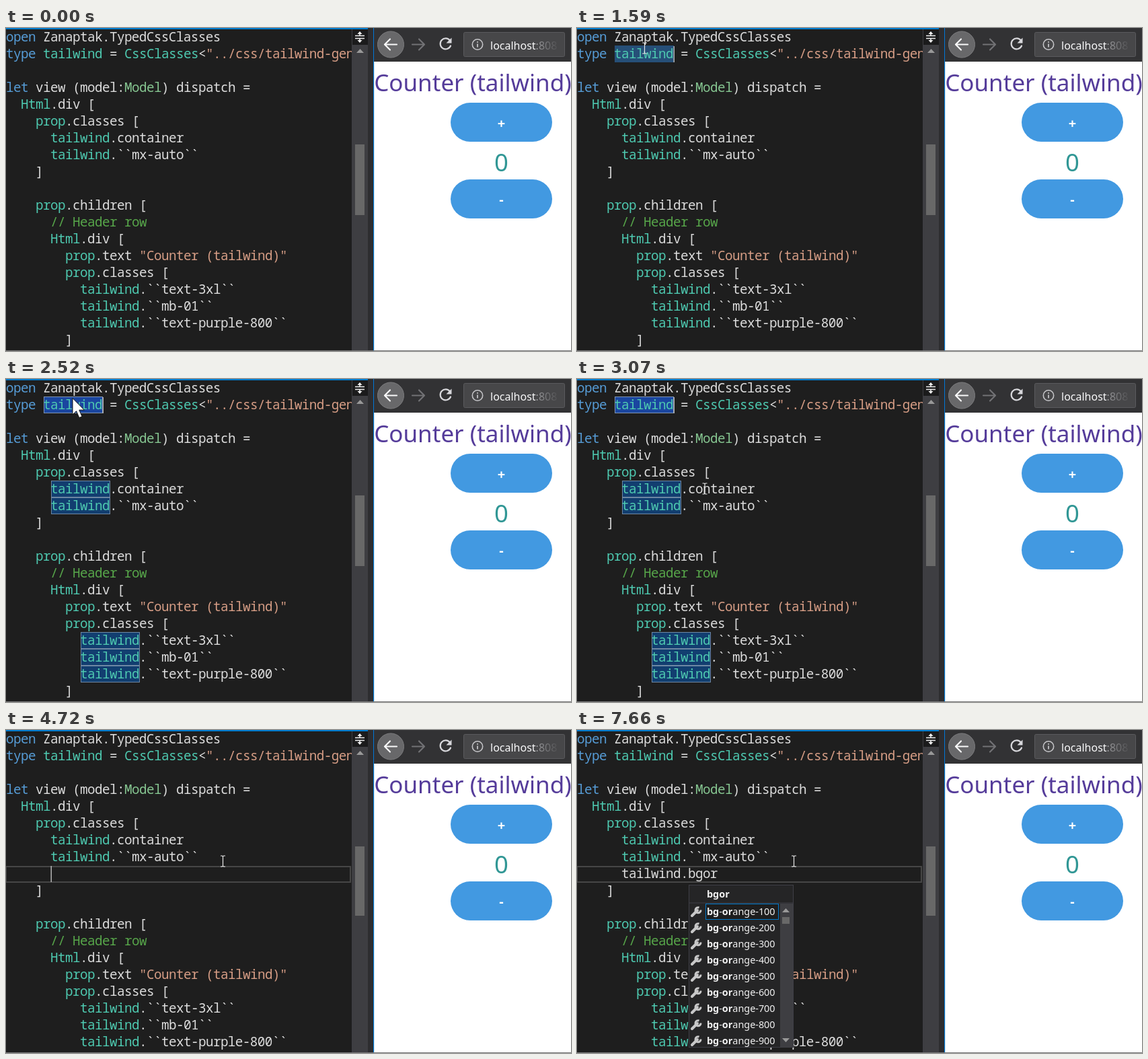
An HTML page for the animation above (8000 ms loop, 840x480 px).

```html
<!DOCTYPE html>
<html lang="en">
<head>
<meta charset="utf-8">
<title>Typed CSS classes</title>
<style>
  html, body { margin: 0; width: 100%; height: 100%; overflow: hidden; background: #1e1e1e; }
  svg { display: block; width: 840px; height: 480px; }
  .code { font: 19.3px "Noto Sans Mono", "DejaVu Sans Mono", monospace; letter-spacing: -.58px; fill: #dcdcdc; }
  .ui { font-family: "Noto Sans", "Open Sans", sans-serif; }
  .bold { font-weight: 700; }
  .word { fill: #569cd6; }
  .type { fill: #4ec9b0; }
  .record { fill: #86c691; }
  .string { fill: #d69d85; }
  .comment { fill: #57a64a; }
  .ref { fill: #123e70; stroke: #6d87a3; }
</style>
</head>
<body>
<svg viewBox="0 0 840 480" xmlns="http://www.w3.org/2000/svg">
  <defs>
    <clipPath id="pane"><rect width="514" height="479"/></clipPath>
    <linearGradient id="fade" gradientUnits="userSpaceOnUse" x1="787" x2="823" y1="0" y2="0">
      <stop stop-color="#a0a0a3"/><stop offset="1" stop-color="#474749"/>
    </linearGradient>
  </defs>

  <!-- editor -->
  <rect width="538" height="480" fill="#1e1e1e"/>
  <g clip-path="url(#pane)">
    <g id="marks"></g>
    <rect id="line" x="0" width="512" height="23" fill="none" stroke="#464646" stroke-width="2"/>
    <g class="code" transform="translate(-1 0)">
      <g id="head"></g>
      <g id="tail"></g>
      <text id="typed" x="67" y="220"></text>
    </g>
    <rect id="caret" width="1.5" height="24" fill="#b4b4b4"/>
  </g>
  <rect x="514" width="24" height="480" fill="#3e3e42"/>
  <rect x="515" y="2" width="23" height="23" fill="#1b1b1c"/>
  <path d="M519 11.5h14M519 15.5h14M526 6v5M526 16v5" stroke="#f1f1f1" stroke-width="1.6"/>
  <path d="M522.5 9l3.5-4 3.5 4zM522.5 18l3.5 4 3.5-4z" fill="#f1f1f1"/>
  <path d="M521 37l5.5-6 5.5 6z" fill="#999"/>
  <rect id="thumb" x="519" y="173" width="14" fill="#686868"/>
  <rect width="538" height="2" fill="#007acc"/>

  <!-- browser -->
  <rect x="538" width="9" height="480" fill="#2d2d30"/>
  <rect x="547" width="293" height="50" fill="#323234"/>
  <rect x="547" y="50" width="293" height="430" fill="#fff"/>
  <rect x="546" width="1" height="480" fill="#0078d7"/>
  <rect x="547" y="50" width="1" height="430" fill="#cfe3f3"/>
  <circle cx="572" cy="24.5" r="19.5" fill="#68686a" stroke="#7c7c7e"/>
  <g fill="none" stroke-width="2.2" stroke-linecap="round" stroke-linejoin="round">
    <path d="M581 24.5h-17m7-8l-8 8 8 8" stroke="#f9f9fa"/>
    <path d="M604 24.5h17m-7-8l8 8-8 8" stroke="#727275"/>
    <path d="M660 18.5a8 8 0 1 0 1 8" stroke="#d7d7db"/>
  </g>
  <path d="M662.5 14.5v8h-8z" fill="#d7d7db"/>
  <rect x="680.5" y="6.5" width="150" height="36" rx="2" fill="#474749" stroke="#5a5a5d"/>
  <circle cx="701" cy="24.5" r="7.7" fill="none" stroke="#c4c4c7" stroke-width="1.6"/>
  <path d="M701 23.5v5M701 20v1.8" stroke="#c4c4c7" stroke-width="1.8"/>
  <text class="ui" x="720" y="31.5" font-size="16" fill="#f9f9fa">localhost<tspan fill="url(#fade)">:808</tspan></text>

  <g class="ui">
    <text x="547.2" y="93.5" font-size="35" fill="#553c9a">Counter (tailwind)</text>
    <rect x="661" y="111" width="151" height="58" rx="29" fill="#4299e1"/>
    <rect x="661" y="225" width="151" height="58" rx="29" fill="#4299e1"/>
    <g text-anchor="middle">
      <text class="bold" x="736.5" y="148.5" font-size="20" fill="#fff">+</text>
      <text x="736.5" y="213" font-size="36.5" fill="#319795">0</text>
      <text class="bold" x="736.5" y="262" font-size="20" fill="#fff">-</text>
    </g>
  </g>
  <rect y="479" width="840" height="1" fill="#777"/>

  <!-- completion list -->
  <g id="popup" class="ui" font-size="14.4" fill="#f1f1f1">
    <rect x="166.5" y="230.5" width="155" height="241" fill="#252526" stroke="#3f3f46"/>
    <path d="M167 257h154" stroke="#3f3f46"/>
    <text class="bold" x="193" y="249">bgor</text>
    <rect x="191.5" y="258.5" width="108" height="23" fill="#1e1e1e" stroke="#007acc"/>
    <rect x="302" y="258" width="19" height="213" fill="#3e3e42"/>
    <path d="M305 271l5.5-6 5.5 6zM305 458l5.5 6 5.5-6z" fill="#999"/>
    <rect x="305" y="278" width="11" height="10" fill="#686868"/>
    <g id="items"></g>
  </g>

  <!-- pointers -->
  <path id="beam" d="M-3.5-8h2.5l1 1 1-1h2.5M0-7V7M-3.5 8h2.5l1-1 1 1h2.5" fill="none" stroke="#e6e6e6" stroke-width="1.2"/>
  <path id="arrow" d="M0 0V24.5L5.6 19.2 9.8 29 14 27.2 9.8 17.6H17.4Z" fill="#fff" stroke="#111"/>
</svg>
<script>
const LOOP = 8000, COL = 11, ROW = 25;
const $ = id => document.getElementById(id);
const colX = col => 1 + COL * col;
const rowY = row => 1 + ROW * row;

function add(parent, tag, attrs, text) {
  const el = document.createElementNS("http://www.w3.org/2000/svg", tag);
  for (const name in attrs) el.setAttribute(name, attrs[name]);
  if (text) el.textContent = text;
  return parent.appendChild(el);
}
const set = (id, attrs) => { for (const name in attrs) $(id).setAttribute(name, attrs[name]); };
const show = (el, on) => el.setAttribute("visibility", on ? "visible" : "hidden");

const source = `open Zanaptak.TypedCssClasses
type tailwind = CssClasses<"../css/tailwind-gen

let view (model:Model) dispatch =
  Html.div [
    prop.classes [
      tailwind.container
      tailwind.\`\`mx-auto\`\`
    ]

    prop.children [
      // Header row
      Html.div [
        prop.text "Counter (tailwind)"
        prop.classes [
          tailwind.\`\`text-3xl\`\`
          tailwind.\`\`mb-01\`\`
          tailwind.\`\`text-purple-800\`\`
        ]`.split("\n");

const kinds = ["comment", "string", "word", "type", "record"];
const token = /(\/\/.*)|("[^"]*"?)|\b(open|type|let)\b|\b(Html|prop|tailwind|CssClasses)\b|\b(Model)\b/g;

function drawLine(line, row) {
  const parent = $(row < 8 ? "head" : "tail");
  const run = (start, text, kind) => {
    for (const m of text.matchAll(/\S+/g))
      add(parent, "text", { x: colX(start + m.index), y: rowY(row) + 19, class: kind }, m[0]);
  };
  let end = 0;
  for (const m of line.matchAll(token)) {
    run(end, line.slice(end, m.index), "");
    run(m.index, m[0], kinds[m.slice(1).findIndex(Boolean)]);
    end = m.index + m[0].length;
  }
  run(end, line.slice(end), "");
}
source.forEach(drawLine);

const mark = (row, col, len) => add($("marks"), "rect",
  { x: colX(col) + .5, y: rowY(row) + .5, width: len * COL - 1, height: ROW - 1, class: "ref" });
const selection = mark(1, 5, 8);
const refs = [[6, 6], [7, 6], [15, 10], [16, 10], [17, 10]].map(([row, col]) => mark(row, col, 8));
const nameRef = mark(7, 15, 11);

for (let i = 0; i < 9; i++) {
  const y = 270 + 24 * i;
  const label = add($("items"), "text", { x: 193, y: y + 5 });
  add(label, "tspan", { class: "bold" }, "bg");
  add(label, "tspan", {}, "-");
  add(label, "tspan", { class: "bold" }, "or");
  add(label, "tspan", {}, `ange-${i + 1}00`);
  const icon = add($("items"), "g", { transform: `translate(177 ${y})`, fill: "none", stroke: "#c8c8c8" });
  add(icon, "path", { d: "M-6 6L2-2", "stroke-width": 4, "stroke-linecap": "round" });
  add(icon, "path", { d: "M4.5-6A4 4 0 1 0 7-2.5", "stroke-width": 3 });
}

// time, x, y, pointer
const moves = [
  [0, 0, 0, ""],
  [500, 250, 421, "beam"], [680, 204, 298, "beam"], [870, 150, 150, "beam"],
  [1050, 112, 62, "beam"], [1230, 102, 36, "beam"], [1410, 100.5, 30, "beam"],
  [1780, 99, 28.5, "arrow"],
  [2890, 135, 92, "beam"], [3070, 190, 163, "beam"],
  [3250, 262, 188, "beam"], [3430, 322.5, 195, "beam"]
];
// time, typed text, caret column (-1 when hidden)
const keys = [
  [0, "", -1], [1590, "", 13], [3610, "", 26], [3790, "", -1],
  [4720, "", 6], [5090, "tailwind", 14], [5650, "tailwind.", -1],
  [6020, "tailwind.", 15], [6200, "tailwind.b", 16], [6380, "tailwind.bg", 17],
  [6560, "tailwind.bgo", 18], [6740, "tailwind.bgo", -1],
  [7110, "tailwind.bgor", 19], [7660, "tailwind.bgor", -1]
];
const at = (list, t) => list.findLast(step => step[0] <= t);

function render(t) {
  const within = (from, to) => t >= from && t < to;
  const split = t >= 4720;

  show(selection, within(1590, 3610));
  selection.style.fill = t < 2520 ? "#264f78" : "#1a46a0";
  selection.style.stroke = t < 2520 ? "#264f78" : "#7f93b0";
  refs.forEach(el => show(el, within(2520, 3610)));
  show(nameRef, within(4350, 4720));

  set("tail", { transform: `translate(0 ${split ? ROW : 0})` });
  set("thumb", { height: split ? 103 : 105 });
  set("line", { y: split ? 203 : 178 });
  show($("line"), t >= 3610);

  const [, text, col] = at(keys, t);
  $("typed").textContent = text;
  const row = split ? 8 : t < 3610 ? 1 : 7;
  set("caret", { x: colX(Math.max(col, 0)) - .5, y: rowY(row) + 1 });
  show($("caret"), col >= 0);
  show($("popup"), t >= 7290);

  const [, x, y, pointer] = at(moves, t);
  for (const id of ["beam", "arrow"]) {
    set(id, { transform: `translate(${x} ${y})` });
    show($(id), id === pointer);
  }
}

const start = performance.now();
function tick() {
  render((performance.now() - start) % LOOP);
  requestAnimationFrame(tick);
}
tick();
</script>
</body>
</html>
```
